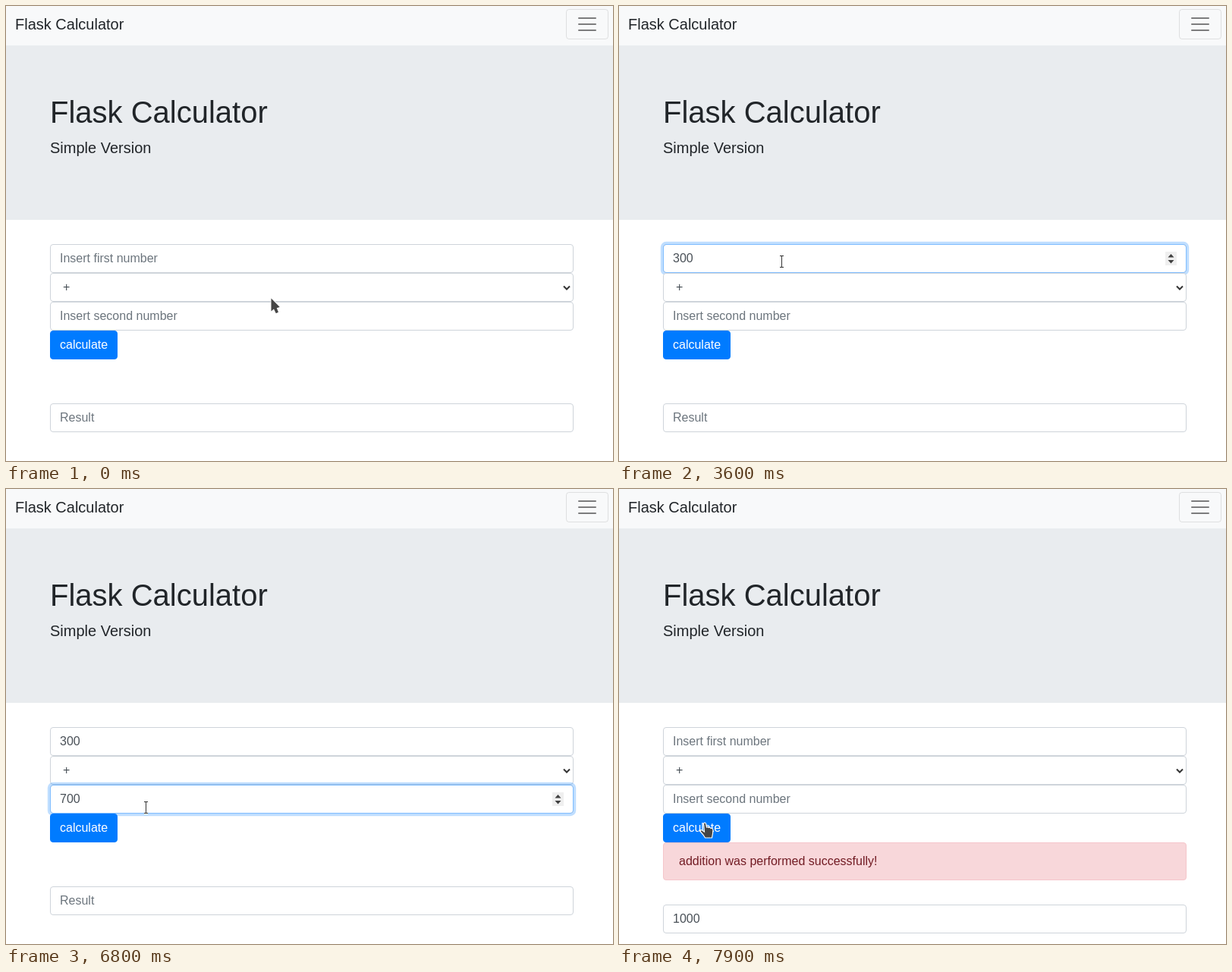
Animation, 800 px wide and 600 px high, one loop 8000 ms. Source, as an HTML page:

```html
<!DOCTYPE html>
<html lang="en">
<head>
<meta charset="utf-8">
<title>Flask Calculator</title>
<style>
  html, body { margin: 0; width: 100%; height: 100%; overflow: hidden; }
  body { background: #fff; color: #212529; font: 16px/24px "Liberation Sans", Arial, sans-serif; }
  #stage { position: relative; width: 800px; height: 600px; overflow: hidden; white-space: pre; }
  #stage * { position: absolute; box-sizing: border-box; }
  nav { left: 0; top: 0; width: 800px; height: 52px; background: #f8f9fa; }
  .brand { left: 12px; top: 9px; font-size: 20px; line-height: 30px; }
  .toggler { left: 738px; top: 4px; width: 56px; height: 40px; border: 1px solid rgba(0,0,0,.1); border-radius: 4px; }
  .toggler svg { left: 12px; top: 4px; }
  header { left: 0; top: 52px; width: 800px; height: 230px; background: #e9ecef; }
  h1 { left: 58px; top: 64px; margin: 0; font-size: 40px; line-height: 48px; font-weight: 400; }
  .lead { left: 58px; top: 120px; font-size: 20px; line-height: 30px; }
  .field { left: 58px; width: 690px; height: 38px; padding: 6px 12px; border: 1px solid #ced4da;
    border-radius: 4px; background: #fff; color: #495057; }
  .field.empty { color: #6c757d; }
  .field::after, .button::after { content: ""; position: absolute; inset: -1px; border-radius: 4px; opacity: var(--focus, 0); }
  .field::after { border: 1px solid #80bdff; box-shadow: 0 0 0 3.2px rgba(0,123,255,.25); }
  .caret { width: 1px; height: 17px; background: #495057; }
  .spinner { left: 661px; top: 9px; }
  .button { left: 58px; top: 428px; width: 89px; height: 38px; padding: 6px 12px; border: 1px solid #007bff;
    border-radius: 4px; background: #007bff; color: #fff; }
  .button.hover { background: #0069d9; border-color: #0062cc; }
  .button::after { box-shadow: 0 0 0 3.2px rgba(38,143,255,.5); }
  .alert { left: 58px; top: 466px; width: 690px; height: 50px; padding: 12px 20px; border: 1px solid #f5c6cb;
    border-radius: 4px; background: #f8d7da; color: #721c24; }
  #cursor { left: 0; top: 0; overflow: visible; }
</style>
</head>
<body>
<div id="stage">
  <nav>
    <div class="brand">Flask Calculator</div>
    <div class="toggler">
      <svg width="30" height="30"><path d="M4 7h22M4 15h22M4 23h22" stroke="rgba(0,0,0,.5)" stroke-width="2" stroke-linecap="round"/></svg>
    </div>
  </nav>
  <header>
    <h1>Flask Calculator</h1>
    <div class="lead">Simple Version</div>
  </header>
  <div class="field" id="first" style="top:314px"></div>
  <div class="field" style="top:352px"><span style="left:16px">+</span>
    <svg style="left:674px;top:14px" width="12" height="10"><path d="M2 2.5l4 4 4-4" fill="none" stroke="#333" stroke-width="2"/></svg>
  </div>
  <div class="field" id="second" style="top:390px"></div>
  <div class="button" id="button">calculate</div>
  <div class="alert" id="alert">addition was performed successfully!</div>
  <div class="field" id="result"></div>
  <svg id="cursor" width="1" height="1">
    <g id="arrow"><path d="M.5 .5V17.5L4 14.5L6.8 20.3L10 18.8L7.8 13.3L11.8 12Z" fill="#454545" stroke="#fff" stroke-width="1.6" paint-order="stroke"/></g>
    <g id="beam" fill="none">
      <path d="M-2 -7.5H3M-2 7.5H3M.5 -7.5V7.5" stroke="#fff" stroke-width="3"/>
      <path d="M-2 -7.5H3M-2 7.5H3M.5 -7.5V7.5" stroke="#333"/>
    </g>
    <g id="hand"><path d="M-.5 1Q1 -1 2.5 1L3.5 6Q5 5 6 6.5Q8 5.5 9 7.5Q11.5 7 12 9.5L11.5 14.5L10.5 20H1.5L-1 16L-5 11.5Q-5 9 -2.5 10L.5 12Z" fill="#454545" stroke="#fff" stroke-width="1.2"/></g>
  </svg>
</div>
<script>
const LOOP = 8000, TICK = 100, SUBMIT = 7900;
const $ = id => document.getElementById(id);
const clamp = v => Math.min(1, Math.max(0, v));
const smooth = v => v * v * (3 - 2 * v);
const show = (el, on) => { el.style.visibility = on ? "visible" : "hidden"; };

// time, x, y
const path = [
  [100, 349, 385], [1000, 214, 336], [3500, 214, 336], [3600, 214, 337], [4000, 213, 380],
  [4100, 213, 380], [4500, 185, 422], [4600, 184, 420], [6800, 184, 420], [7400, 114, 445], [7600, 112, 440]
];
const caretOn = [[800, 1400], [2000, 3600], [4200, 5300], [5800, 6800]];
const within = (t, [a, b]) => t >= a && t < b;
const ramp = (t, at) => clamp((t - at) / 150);

function makeField(id, y, hint, value, keys, focus) {
  const el = $(id);
  el.innerHTML = `<span></span><i class="caret"></i><svg class="spinner" width="15" height="18">
    <path fill="#efefef" d="M0 0h15v18H0z"/><path fill="#404040" d="M3.5 7.5l4-4.5 4 4.5zM3.5 11l4 4.5 4-4.5z"/></svg>`;
  const [text, caret, spinner] = el.children;
  text.style.left = "12px";
  return (t, cursor) => {
    const typed = t < SUBMIT ? keys.filter(k => t >= k).length : 0;
    const focused = within(t, focus);
    text.textContent = typed ? value.slice(0, typed) : hint;
    el.classList.toggle("empty", !typed);
    el.style.setProperty("--focus", t < SUBMIT ? ramp(t, focus[0] - 50) - ramp(t, focus[1] - 50) : 0);
    caret.style.left = 12 + Math.round(typed * 8.9) + "px";
    caret.style.top = (typed ? 9 : 10) + "px";
    show(caret, focused && caretOn.some(span => within(t, span)));
    show(spinner, focused || within(cursor.y, [y, y + 38]));
  };
}

const fields = [
  makeField("first", 314, "Insert first number", "300", [2600, 2800, 3000], [800, 4800]),
  makeField("second", 390, "Insert second number", "700", [5800, 6000, 6200], [4800, 7600])
];

function cursorAt(t) {
  const i = path.findIndex(p => p[0] > t);
  const [t1, x1, y1] = path[i < 0 ? path.length - 1 : i];
  const [t0, x0, y0] = path[i < 0 ? path.length - 1 : Math.max(0, i - 1)];
  const k = t1 > t0 ? smooth(clamp((t - t0) / (t1 - t0))) : 0;
  return { x: Math.round(x0 + (x1 - x0) * k), y: Math.round(y0 + (y1 - y0) * k) };
}

function cursorKind({ x, y }, t) {
  if (within(y, [314, 352]) || within(y, [390, 428])) return "beam";
  const loading = within(t, [7700, SUBMIT]);
  return y >= 428 && x < 147 && !loading ? "hand" : "arrow";
}

function render(t) {
  const cursor = cursorAt(t), kind = cursorKind(cursor, t), done = t >= SUBMIT;
  fields.forEach(update => update(t, cursor));
  $("cursor").style.transform = `translate(${cursor.x}px, ${cursor.y}px)`;
  for (const k of ["arrow", "beam", "hand"]) show($(k), k === kind);
  $("button").classList.toggle("hover", !done && cursor.y >= 428 && cursor.x < 147);
  $("button").style.setProperty("--focus", done ? 0 : ramp(t, 7550));
  show($("alert"), done);
  $("result").style.top = (done ? 548 : 524) + "px";
  $("result").textContent = done ? "1000" : "Result";
  $("result").classList.toggle("empty", !done);
}

let start;
function frame(now) {
  start ??= now;
  render(Math.floor(((now - start) % LOOP) / TICK) * TICK);
  requestAnimationFrame(frame);
}
render(0);
requestAnimationFrame(frame);
</script>
</body>
</html>
```
